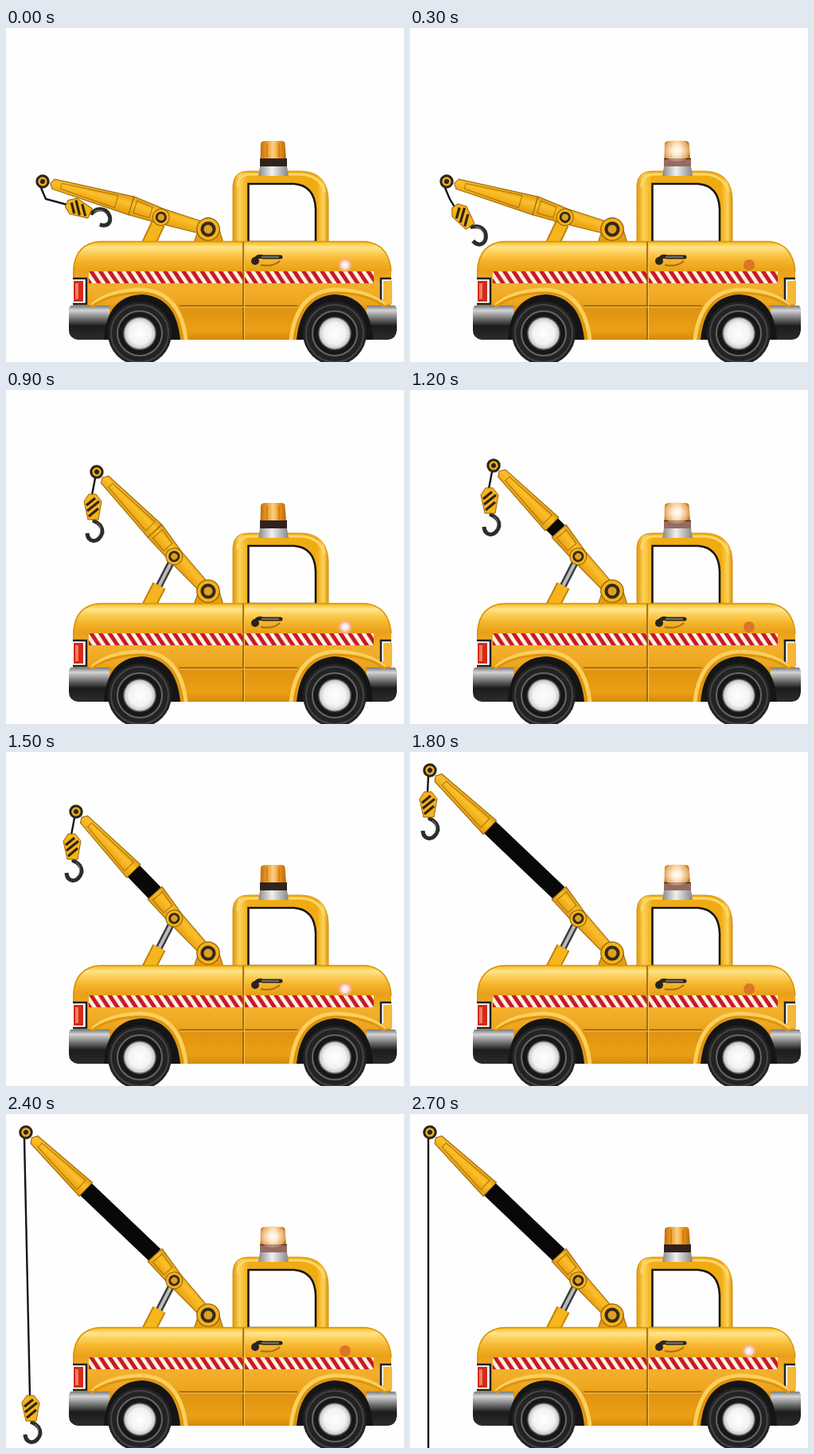
Animation of 500x420 px, one loop 3000 ms. Source, as an HTML page:

```html
<!DOCTYPE html>
<html lang="en">
<head>
<meta charset="utf-8">
<title>Tow truck</title>
<style>
html, body { margin: 0; width: 100%; height: 100%; overflow: hidden; background: #fefefe; }
svg { display: block; width: 500px; height: 420px; }
</style>
</head>
<body>
<svg viewBox="0 0 500 420">
  <defs>
    <linearGradient id="paint" gradientUnits="userSpaceOnUse" x1="0" y1="267" x2="0" y2="393">
      <stop offset="0" stop-color="#d99a10"/><stop offset=".03" stop-color="#fbc83a"/>
      <stop offset=".07" stop-color="#ffe48e"/><stop offset=".12" stop-color="#fcd05a"/>
      <stop offset=".2" stop-color="#f5b52c"/><stop offset=".3" stop-color="#e9a01a"/>
      <stop offset=".45" stop-color="#f3b02e"/><stop offset=".63" stop-color="#eda51e"/>
      <stop offset=".67" stop-color="#e0930f"/><stop offset=".9" stop-color="#eaa015"/>
      <stop offset="1" stop-color="#cf870a"/>
    </linearGradient>
    <linearGradient id="cab">
      <stop offset="0" stop-color="#dd980f"/><stop offset=".07" stop-color="#fdd258"/>
      <stop offset=".16" stop-color="#f0ad18"/><stop offset=".88" stop-color="#f0ab12"/>
      <stop offset=".95" stop-color="#fdd258"/><stop offset="1" stop-color="#d5920c"/>
    </linearGradient>
    <linearGradient id="bumper" x2="0" y2="1">
      <stop offset="0" stop-color="#777"/><stop offset=".14" stop-color="#d5d5d5"/>
      <stop offset=".4" stop-color="#6a6a6a"/><stop offset=".6" stop-color="#1c1c1c"/>
      <stop offset="1" stop-color="#2c2c2c"/>
    </linearGradient>
    <linearGradient id="dome">
      <stop offset="0" stop-color="#c06d0a"/><stop offset=".25" stop-color="#ee9a28"/>
      <stop offset=".5" stop-color="#fbd084"/><stop offset=".72" stop-color="#ec961e"/>
      <stop offset="1" stop-color="#b86709"/>
    </linearGradient>
    <linearGradient id="steel">
      <stop offset="0" stop-color="#888"/><stop offset=".45" stop-color="#f0f0f0"/>
      <stop offset="1" stop-color="#858585"/>
    </linearGradient>
    <linearGradient id="arm" gradientUnits="userSpaceOnUse" x1="0" y1="-13" x2="0" y2="13">
      <stop offset="0" stop-color="#dc9508"/><stop offset=".4" stop-color="#fcc02a"/>
      <stop offset="1" stop-color="#e2970b"/>
    </linearGradient>
    <radialGradient id="hub">
      <stop offset="0" stop-color="#fff"/><stop offset=".7" stop-color="#f2f2f2"/>
      <stop offset="1" stop-color="#c4c4c4"/>
    </radialGradient>
    <radialGradient id="flash">
      <stop offset="0" stop-color="#fff"/><stop offset=".4" stop-color="#fff0dc" stop-opacity=".9"/>
      <stop offset="1" stop-color="#ffd9c0" stop-opacity=".35"/>
    </radialGradient>
    <radialGradient id="shine">
      <stop offset="0" stop-color="#fff"/><stop offset=".5" stop-color="#ffdcd0"/>
      <stop offset="1" stop-color="#f5a27c" stop-opacity=".5"/>
    </radialGradient>
    <pattern id="stripes" width="11.6" height="15" patternUnits="userSpaceOnUse" x="103" y="306">
      <rect width="12" height="15" fill="#fdf3e6"/>
      <path d="M-10.6 0h6l10 15h-6zM1 0h6l10 15h-6z" fill="#c8191f"/>
    </pattern>
    <g id="joint">
      <circle r="10.5" fill="#f6b319" stroke="#94630c"/>
      <circle r="5.6" fill="#dd9f24" stroke="#332a1c" stroke-width="3"/>
    </g>
    <g id="well">
      <path d="M108 349Q128 330 170 329Q219 331 226 392" fill="none" stroke="#fdcf5c" stroke-width="5"/>
      <path d="M107 351Q130 333 170 333Q214 334 222 392" fill="none" stroke="#dd9410" stroke-width="3"/>
      <path d="M123 392Q126 337 171 335Q214 338 219 392Z" fill="#151515"/>
    </g>
    <g id="wheel">
      <circle r="40" fill="#232323"/>
      <circle r="36" fill="none" stroke="#444" stroke-width="2"/>
      <circle r="28" fill="#171717" stroke="#666" stroke-width="2"/>
      <circle r="21" fill="#555"/>
      <circle r="19.500" fill="url(#hub)"/>
    </g>
  </defs>

  <!-- crane -->
  <path id="rod" stroke="#3c3c3c" stroke-width="9"/>
  <path id="rodShine" stroke="#bbb" stroke-width="4"/>
  <path id="sleeve" stroke="#c08006" stroke-width="18"/>
  <path id="sleeveFace" stroke="#f6b51c" stroke-width="14"/>
  <path id="rope" fill="none" stroke="#151515" stroke-width="2.4"/>
  <path d="M236 270L243 250Q254 233 266 247L273 270Z" fill="#e59d11" stroke="#94630c"/>
  <g id="outer">
    <path id="shaft" stroke="#080808" stroke-width="21"/>
    <g id="tip">
      <path id="plate" fill="url(#arm)" stroke="#94630c"/>
      <path d="M96 -8L24 -4V3L96 8Z" fill="none" stroke="#a8700e"/>
      <circle r="7.2" fill="#e8ac22" stroke="#2a241b" stroke-width="3"/>
      <circle r="3" fill="#2a241b"/>
    </g>
  </g>
  <g id="inner">
    <path d="M-101 -12L-60 -8L-4 -7V8L-60 11L-101 12Z" fill="url(#arm)" stroke="#94630c"/>
    <path d="M-96 -8L-75 -6V8L-96 8Z" fill="none" stroke="#a8700c"/>
    <use href="#joint" x="-61" y="3"/>
    <g transform="scale(1.35)"><use href="#joint"/></g>
  </g>
  <g id="hook">
    <path d="M3 30V34C11 37 13 42 13 48C10 61 -5 63 -6 49" fill="none" stroke="#2c2c2c" stroke-width="5"/>
    <path d="M6 36C11 39 12 46 9 52" fill="none" stroke="#888"/>
    <path d="M-4 0H5L12 9L8 32H-5L-10 9Z" fill="#f6b319" stroke="#94630c"/>
    <path d="M-7 14L4 5M-6 21L9 9M-4 28L8 18" stroke="#30240f" stroke-width="3.2"/>
  </g>

  <!-- truck -->
  <path d="M285 272V198Q286 180 304 180H371Q404 181 405 216V272Z" fill="url(#cab)" stroke="#d6940e"/>
  <path d="M291 200Q291 185 306 184H370Q394 185 400 206" fill="none" stroke="#fdd76a" stroke-width="3"/>
  <path d="M304.500 196H362Q388 198 389 228V269H304.500Z" fill="#fefefe" stroke="#151515" stroke-width="2.500"/>
  <path d="M319.500 165L320 145Q321 142 326 142H346Q350 142 350.500 145L352 165Z" fill="url(#dome)"/>
  <path d="M328 145V163M343 145V163" stroke="#c8780f" stroke-width="1.500"/>
  <rect x="319" y="164" width="34" height="11" fill="#30231d"/>
  <path d="M319 174H353L355 186H317Z" fill="url(#steel)"/>
  <g id="flashing">
    <ellipse cx="335" cy="154" rx="17" ry="14" fill="url(#flash)"/>
    <rect x="319" y="165" width="34" height="9" fill="#d99a8c" opacity=".6"/>
  </g>

  <path d="M84 350V304Q86 270 118 268H452Q481 271 484 306V350H470V392H112V350Z" fill="url(#paint)"/>
  <path d="M85 340V304Q87 271 118 268.500H452Q481 272 484 306" fill="none" stroke="#d6940e" stroke-width="1.500"/>
  <rect x="104" y="306" width="358" height="15" fill="url(#stripes)"/>
  <path d="M298 269V392M218 349.500H366" stroke="#8e5906" stroke-width="1.500"/>
  <path d="M299.500 271V392M218 351H366" stroke="#f8c654"/>
  <path d="M312 294Q315 285 323 288H345" fill="none" stroke="#29241e" stroke-width="5" stroke-linecap="round"/>
  <circle cx="313" cy="293" r="5" fill="#29241e"/>
  <path d="M321 288H343" stroke="#999" stroke-width="1.300"/>
  <path d="M320 298Q335 301 344 293" fill="none" stroke="#a86d0c" stroke-width="2"/>

  <path d="M84 315H101V347H84" fill="#fff" stroke="#222" stroke-width="2.500"/>
  <rect x="85" y="318" width="12" height="26" fill="#d42a1c"/>
  <rect x="87" y="321" width="4" height="20" fill="#f77a5c"/>
  <path d="M484 315H471V348" fill="#fff" stroke="#222" stroke-width="2.500"/>
  <rect x="474" y="318" width="11" height="29" fill="#f5b93a"/>
  <path d="M81 349H130V392H90Q79 390 79 380V353Z" fill="url(#bumper)"/>
  <path d="M453 349H489L491 353V380Q490 391 480 392H453Z" fill="url(#bumper)"/>
  <use href="#well"/>
  <use href="#well" transform="matrix(-1 0 0 1 584 0)"/>
  <use href="#wheel" x="168" y="384"/>
  <use href="#wheel" x="413" y="384"/>
  <circle cx="426" cy="298" r="7" fill="#dd7428"/>
  <circle id="glow" cx="426" cy="298" r="9" fill="url(#shine)"/>
</svg>
<script>
const STEP = 300;
// boom end x, y; hook x, y, angle; beacon lit; badge shining
const poses = [
  [46, 193, 76, 221, -65, 0, 1],
  [46, 193, 56, 224, -35, 1, 0],
  [46, 193, 43, 223, 0, 0, 0],
  [114, 103, 108, 131, 0, 0, 1],
  [105, 95, 99, 123, 0, 1, 0],
  [88, 75, 82, 103, 0, 0, 1],
  [25, 23, 22, 50, 0, 1, 0],
  [25, 23, 26, 200, 0, 0, 1],
  [25, 23, 30, 354, 0, 1, 0],
  [25, 23, 23, 430, 0, 0, 1]
];
const pivot = { x: 254, y: 253 }, foot = { x: 176, y: 278 };
const ELBOW = 101, TIP = 104;
const set = (id, name, value) => document.getElementById(id).setAttribute(name, value);
const place = (id, p, angle) => set(id, 'transform', `translate(${p.x} ${p.y}) rotate(${angle * 180 / Math.PI})`);
const line = (a, b) => `M${a.x} ${a.y}L${b.x} ${b.y}`;
const onArm = (x, y, a) => ({
  x: pivot.x + x * Math.cos(a) - y * Math.sin(a),
  y: pivot.y + x * Math.sin(a) + y * Math.cos(a)
});

function draw([x, y, hx, hy, turn, lit, shine]) {
  const raised = y < 150;
  const lift = (raised ? 48.5 : 17) * Math.PI / 180;
  const elbow = onArm(-ELBOW, 0, lift), joint = onArm(-61, 3, lift);
  const dx = elbow.x - x, dy = elbow.y - y, length = Math.hypot(dx, dy);
  const rear = raised ? TIP : length;
  place('inner', pivot, lift);
  place('outer', elbow, Math.atan2(dy, dx));
  set('tip', 'transform', `translate(${-length})`);
  set('plate', 'd', `M${rear} -12L14 -7L10 0L14 6L${rear} 12Z`);
  set('shaft', 'd', `M0 0H${rear - length}`);

  const reach = Math.hypot(joint.x - foot.x, joint.y - foot.y);
  const k = Math.min(36, reach - 8) / reach;
  const cuff = { x: foot.x + (joint.x - foot.x) * k, y: foot.y + (joint.y - foot.y) * k };
  for (const id of ['rod', 'rodShine']) set(id, 'd', line(foot, joint));
  for (const id of ['sleeve', 'sleeveFace']) set(id, 'd', line(foot, cuff));

  const bend = turn ? `L${x + 4} ${y + 22}` : '';
  set('rope', 'd', `M${x - 2} ${y + 8}${bend}L${hx} ${hy + 1}`);
  set('hook', 'transform', `translate(${hx} ${hy}) rotate(${turn})`);
  set('flashing', 'visibility', lit ? 'visible' : 'hidden');
  set('glow', 'visibility', shine ? 'visible' : 'hidden');
}

function tick() {
  draw(poses[Math.floor(performance.now() / STEP) % poses.length]);
  requestAnimationFrame(tick);
}
tick();
</script>
</body>
</html>
```
